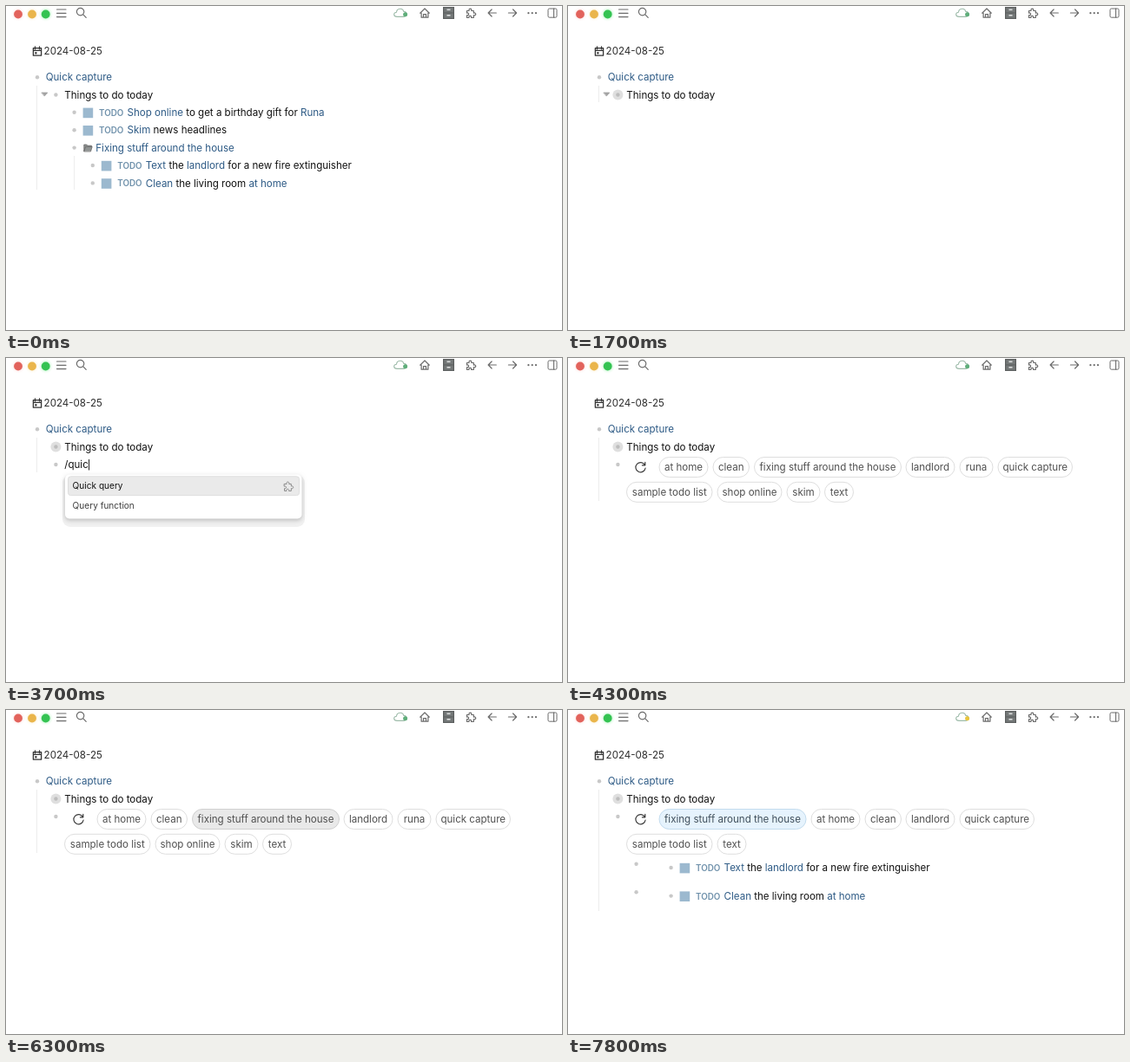
Write an HTML page with a canvas that moves like this. It is 640 px wide and 374 px high and loops after 8000 ms.

```html
<!DOCTYPE html>
<html lang="en">
<head>
<meta charset="utf-8">
<title>Outline and quick query</title>
<style>
  html, body { margin: 0; width: 100%; height: 100%; overflow: hidden; background: #fff; }
  canvas { display: block; width: 640px; height: 374px; }
</style>
</head>
<body>
<canvas id="stage"></canvas>
<script>
const W = 640, H = 374, LOOP = 8000;
const canvas = document.getElementById('stage');
const ctx = canvas.getContext('2d');
const dpr = window.devicePixelRatio || 1;
canvas.width = W * dpr;
canvas.height = H * dpr;

const FAMILY = 'Inter, "Liberation Sans", sans-serif';
const BODY = `11.55px ${FAMILY}`;
const SMALL = `10.1px ${FAMILY}`;
const MARK = `600 9.8px ${FAMILY}`;
const INK = '#111', LINK = '#2d5a85', ICON = '#6b6b6b';

// Moments when the page changes, in ms
const AT = {
  collapse: 1200, newBlock: 2500, menu: 3300, filter: 3500, inserted: 3800,
  chips: 4300, select: 6500, results: 6600, sync: 7000
};

const ramp = (t, a, b) => Math.min(1, Math.max(0, (t - a) / (b - a)));

function text(str, x, y, color = INK, font = BODY, align = 'left') {
  ctx.font = font;
  ctx.fillStyle = color;
  ctx.textAlign = align;
  ctx.fillText(str, x, y);
  return ctx.measureText(str).width;
}

// Alternates plain and linked pieces; linked ones are wrapped in brackets
function rich(str, x, y) {
  for (const part of str.split(/(\[.*?\])/)) {
    if (!part) continue;
    const linked = part[0] === '[';
    x += text(linked ? part.slice(1, -1) : part, x, y, linked ? LINK : INK);
  }
}

function rect(x, y, w, h, color) {
  ctx.fillStyle = color;
  ctx.fillRect(x, y, w, h);
}

function dot(x, y, r, color) {
  ctx.fillStyle = color;
  ctx.beginPath();
  ctx.arc(x, y, r, 0, Math.PI * 2);
  ctx.fill();
}

function box(x, y, w, h, r, fill, stroke) {
  ctx.beginPath();
  ctx.roundRect(x, y, w, h, r);
  if (fill) { ctx.fillStyle = fill; ctx.fill(); }
  if (stroke) { ctx.strokeStyle = stroke; ctx.lineWidth = 1; ctx.stroke(); }
}

function path(d, x, y, color = ICON, width = 1.2, fill) {
  ctx.save();
  ctx.translate(x, y);
  ctx.lineWidth = width;
  ctx.lineCap = ctx.lineJoin = 'round';
  const p = new Path2D(d);
  if (fill) { ctx.fillStyle = fill; ctx.fill(p); }
  if (color) { ctx.strokeStyle = color; ctx.stroke(p); }
  ctx.restore();
}

const bullet = (x, y) => dot(x, y, 2.2, '#c8c8c8');
const guide = (x, top, bottom) => rect(x, top, 1, bottom - top, '#ededed');

const PUZZLE = 'M-4.5-2.8h2.6c-1-3.2 3.6-3.2 2.6 0h2.6v2.6c3.2-1 3.2 3.6 0 2.6v2.8h-2.8' +
  'c.9-2.9-3.4-2.9-2.5 0h-2.5v-2.8c2.8.9 2.8-3.5 0-2.6z';
const ARROW = 'M4.6 0h-9.2m4-4l-4 4l4 4';

function lamp(x, color, glow) {
  const g = ctx.createRadialGradient(x, 9.5, 4, x, 9.5, 9);
  g.addColorStop(0, glow);
  g.addColorStop(1, 'rgba(255,255,255,0)');
  dot(x, 9.5, 9, g);
  dot(x, 9.5, 4.9, color);
}

function toolbar(t) {
  lamp(14, '#e2635c', 'rgba(240,120,115,.2)');
  lamp(30, '#eab54b', 'rgba(240,200,100,.25)');
  lamp(45.7, '#34c352', 'rgba(90,230,120,.4)');
  path('M58.5 4h10.5M58.5 8.3h10.5M58.5 12.6h10.5', 0, 0);
  path('M4.2 0a4.2 4.2 0 1 1-8.4 0a4.2 4.2 0 1 1 8.4 0M3 3l3.6 3.8', 85.6, 6.6);

  path('M-3.8 4.4c-4.6 0-4.6-5 -.7-5.2c.4-5 7.4-5.2 8.2-.8c4.4-.2 4.7 6 .2 6z', 454, 8, '#9dbba9', 1.1);
  dot(459.6, 9.8, 2.5, t < AT.sync ? '#5fae7a' : '#e8c53c');

  path('M-5.3.2l5.3-5.2l5.3 5.2h-1.4v5h-7.8v-5zM-1.5 5v-3.4h3v3.4', 482, 8);

  rect(503, 1, 13, 14, '#5c5f5f');
  for (const y of [2, 8.5]) {
    rect(504.2, y, 10.6, 5.4, '#747878');
    rect(507.5, y + 1.5, 4, 1.6, '#dcdede');
  }
  path(PUZZLE, 535, 8.3);
  path(ARROW, 559.7, 8);
  ctx.save();
  ctx.translate(583, 8);
  ctx.scale(-1, 1);
  path(ARROW, 0, 0);
  ctx.restore();
  for (const x of [601.4, 605.7, 610]) dot(x, 8.2, 1.1, ICON);
  box(624, 3, 10, 10.2, 1.5, null, ICON);
  path('M630.6 3v10', 0, 0, ICON, 1.1);
}

function calendar() {
  path('M-4.6-3.4h9.2v8.6h-9.2zM-4.6-.6h9.2M-2.5-5.2v3M2.5-5.2v3', 36, 52, '#333', 1.3);
  rect(33.3, 53.2, 2.2, 2.2, '#333');
}

function task(x, y, str) {
  bullet(x, y);
  rect(x + 10, y - 5.2, 11.6, 11.6, '#9cb9cf');
  text('TODO', x + 28.5, y + 4, '#6f91ab', MARK);
  rich(str, x + 61, y + 4.2);
}

const TEXT_TASK = '[Text] the [landlord] for a new fire extinguisher';
const CLEAN_TASK = '[Clean] the living room [at home]';

function children() {
  guide(78, 173, 212);
  task(78.6, 122.8, '[Shop online] to get a birthday gift for [Runa]');
  task(78.6, 143.2, '[Skim] news headlines');
  bullet(78.6, 163.6);
  path('M89.8 167.6v-7.6h3l1 1.2h4.6v1.2M89.8 167.6l1.8-5.2h7.6l-1.6 5.2z', 0, 0, '#666', .8, '#8f9392');
  text('Fixing stuff around the house', 103.3, 167.8, LINK);
  task(99.8, 184, TEXT_TASK);
  task(99.8, 204.4, CLEAN_TASK);
}

function outline(t) {
  const folded = t >= AT.collapse;
  let bottom = 212;
  if (folded) bottom = 111;
  if (t >= AT.newBlock) bottom = 132;
  if (t >= AT.chips) bottom = 165;
  if (t >= AT.results) bottom = 232;

  calendar();
  text('2024-08-25', 43.6, 56.1, '#2b2b2b');
  guide(35, 92, bottom);
  bullet(36, 82.3);
  text('Quick capture', 45.7, 86.3, LINK);
  if (folded) dot(57.4, 102.5, 6, '#dfdfdf');
  dot(57.4, 102.5, 2.2, folded ? '#bdbdbd' : '#c8c8c8');
  if (t < AT.newBlock) path('M41.2 100h6.6l-3.3 3.8z', 0, 0, '#a3a3a3', .8, '#a3a3a3');
  text('Things to do today', 67.3, 106.6);
  if (!folded) children();
  if (t >= AT.newBlock) bullet(57.4, 123);
}

function menu(t) {
  const h = t < AT.filter ? 236 : 51;
  box(65, 135, 279, h + 9, 9, '#f1f1f1');
  ctx.save();
  ctx.shadowColor = 'rgba(0,0,0,.22)';
  ctx.shadowBlur = 5 * dpr;
  ctx.shadowOffsetY = 2 * dpr;
  box(68, 134.5, 272.5, h, 5, '#fff');
  ctx.restore();
  box(71.5, 136.8, 266, 21.8, 3, '#eaeaea', '#dedede');
  text('Quick query', 76.6, 151.2, INK, SMALL);
  path(PUZZLE, 325, 148.2, '#8a8a8a', 1);
  text('Query function', 76.6, 174.2, '#3f3f3f', SMALL);
}

function typing(t) {
  const typed = t < AT.inserted
    ? '/quic'.slice(0, 1 + Math.floor((t - AT.menu) / 100)) : '';
  const w = text(typed, 67.3, 127);
  rect(67.6 + w, 117, 1, 12.5, '#222');
  if (t < AT.inserted) menu(t);
}

const ROW1 = 126, ROW2 = 154.8;
// label, left, right, row
const ALL_CHIPS = [
  ['at home', 105, 161, ROW1], ['clean', 167, 208.5, ROW1],
  ['fixing stuff around the house', 214.5, 383.5, ROW1],
  ['landlord', 389, 445, ROW1], ['runa', 451, 489, ROW1],
  ['quick capture', 495, 580.5, ROW1], ['sample todo list', 67.5, 166, ROW2],
  ['shop online', 172, 246, ROW2], ['skim', 252, 290, ROW2], ['text', 295.5, 328.5, ROW2]
];
const LEFT_CHIPS = [
  ['fixing stuff around the house', 105, 274, ROW1], ['at home', 280, 336, ROW1],
  ['clean', 342, 383.5, ROW1], ['landlord', 389, 445, ROW1],
  ['quick capture', 451, 536.5, ROW1], ['sample todo list', 67.5, 166, ROW2],
  ['text', 172, 205, ROW2]
];

function chip([label, left, right, y], hover, chosen) {
  const shade = 255 - 22 * hover, edge = 222 - 14 * hover;
  const fill = chosen ? '#e6f3fd' : `rgb(${shade},${shade},${shade})`;
  const line = chosen ? '#c3dcee' : `rgb(${edge},${edge},${edge})`;
  box(left, y - 11.5, right - left, 23, 11.5, fill, line);
  text(label, (left + right) / 2, y + 4.1, chosen ? '#41505c' : '#505050', BODY, 'center');
}

function query(t) {
  path('M4.9-2.6a5.6 5.6 0 1 0 .7 3.6M5.3-5.6v3.4h-3.4', 83.5, 126, '#3c3c3c', 1.2);
  if (t < AT.select) {
    const hover = {
      skim: ramp(t, 4600, 4800) * (1 - ramp(t, 5200, 5500)),
      fixing: ramp(t, 5800, 6100)
    };
    for (const c of ALL_CHIPS) chip(c, hover[c[0].split(' ')[0]] || 0, false);
  } else {
    LEFT_CHIPS.forEach((c, i) => chip(c, 0, i === 0));
  }
  if (t >= AT.results) {
    bullet(78.6, 177.7);
    task(118.6, 182, TEXT_TASK);
    bullet(78.6, 210.2);
    task(118.6, 214.6, CLEAN_TASK);
  }
}

function draw(t) {
  ctx.setTransform(dpr, 0, 0, dpr, 0, 0);
  rect(0, 0, W, H, '#fff');
  toolbar(t);
  outline(t);
  if (t >= AT.chips) query(t);
  else if (t >= AT.menu) typing(t);
}

const start = performance.now();
function tick() {
  draw((performance.now() - start) % LOOP);
  requestAnimationFrame(tick);
}
tick();
</script>
</body>
</html>
```
